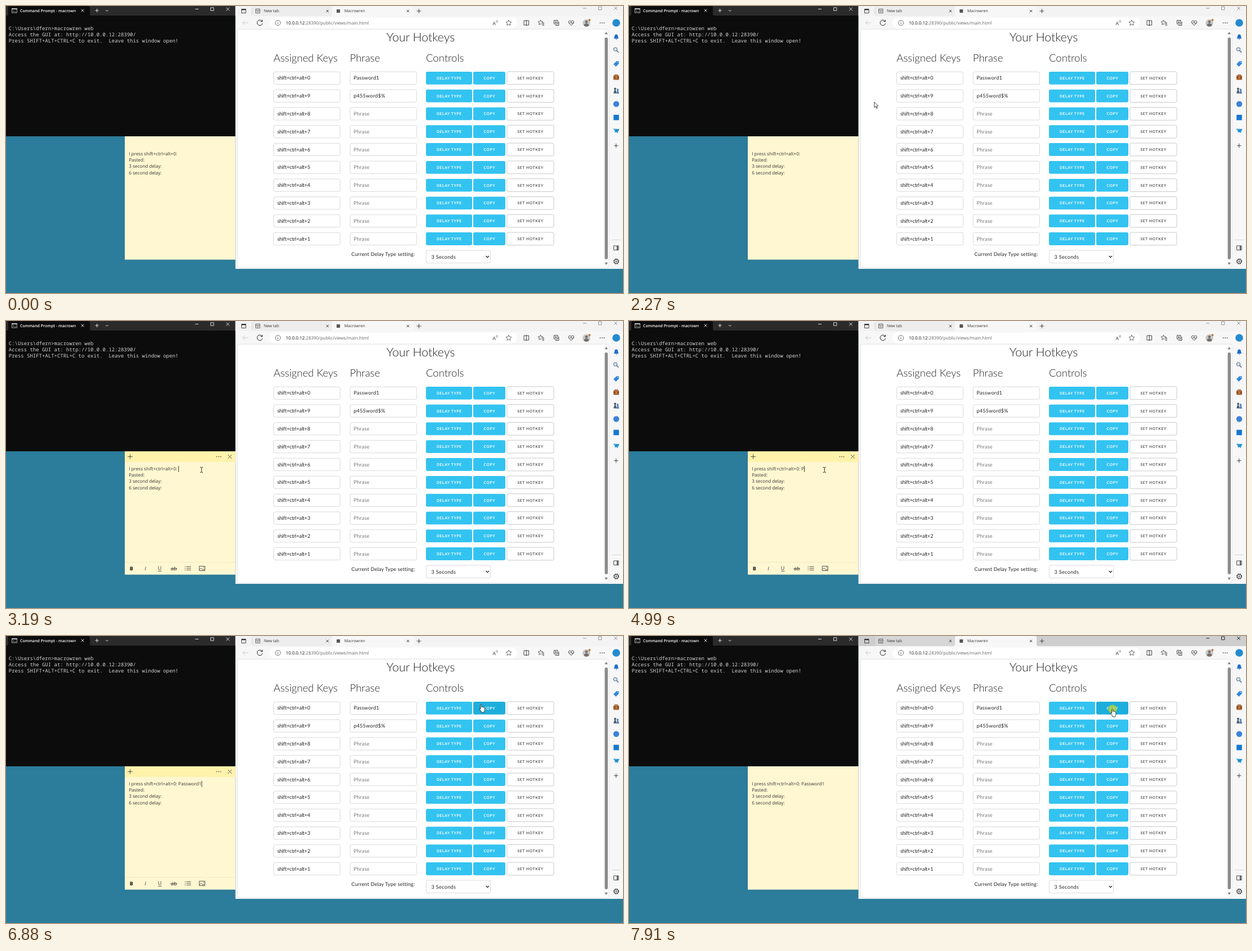
An HTML page that plays this animation: 1096x511 px, repeating every 8000 ms.

```html
<!DOCTYPE html>
<html lang="en">
<head>
<meta charset="utf-8">
<title>Hotkey demo</title>
<style>
  html, body { margin: 0; width: 100%; height: 100%; overflow: hidden; background: #2c7c9b; }
  svg { display: block; width: 100vw; height: 100vh; }
  text { white-space: pre; text-rendering: geometricPrecision; }
  .mono { font: 500 8.97px "Noto Sans Mono", "DejaVu Sans Mono", monospace; fill: #d2d2d2; }
  .caption { font: 600 7px "Open Sans", "Noto Sans", sans-serif; fill: #fff; }
  .tab { font: 7px "Open Sans", "Noto Sans", sans-serif; fill: #333; }
  .url { font: 7.93px "Open Sans", "Noto Sans", sans-serif; fill: #666; }
  .note { font: 8.15px "Open Sans", "Noto Sans", sans-serif; fill: #333; }
  .title, .head, .key, .phrase, .label, .pick, .btn { font-family: Lato, "Open Sans", sans-serif; fill: #222; }
  .title { font-size: 21.3px; font-weight: 300; text-anchor: middle; }
  .head { font-size: 18.5px; font-weight: 300; }
  .key { font-size: 9.05px; letter-spacing: -.2px; }
  .phrase { font-size: 9.05px; letter-spacing: .25px; }
  .empty { fill: #757575; }
  .label { font-size: 9.05px; letter-spacing: .18px; }
  .pick { font-size: 9.05px; letter-spacing: .35px; }
  .btn { font-size: 6.63px; font-weight: 700; letter-spacing: .68px; text-anchor: middle; fill: #fff; }
  .plain { fill: #555; }
  .line { fill: none; stroke: #333; stroke-width: .9; }
  .strip { fill: #f3f3f3; }
  .idle { fill: #ededed; }
  .frame { stroke: #8a8a8a; }
  .active .strip { fill: #cecece; }
  .active .idle { fill: #d6d6d6; }
  .active .frame { stroke: #111; }
</style>
</head>
<body>
<svg id="stage" viewBox="0 0 1096 511" preserveAspectRatio="none"></svg>
<script>
const LOOP = 8000, ROWS = 10, ROW_Y = 128.3, ROW_STEP = 31.8;
const BUTTONS = [
  { x: 746, w: 82, label: 'DELAY TYPE', fill: '#33c3f0', hover: '#1eaedb' },
  { x: 830, w: 57, label: 'COPY', fill: '#33c3f0', hover: '#1eaedb' },
  { x: 889.8, w: 83.2, label: 'SET HOTKEY', fill: '#fff', hover: '#fff' }
];
const FIELDS = [475.5, 611.3], FIELD_W = 118;

const rect = (x, y, w, h, fill, more = '') =>
  `<rect x="${x}" y="${y}" width="${w}" height="${h}" fill="${fill}" ${more}/>`;
const circle = (x, y, r, fill, more = '') => `<circle cx="${x}" cy="${y}" r="${r}" fill="${fill}" ${more}/>`;
const text = (x, y, cls, s, more = '') => `<text x="${x}" y="${y}" class="${cls}" ${more}>${s}</text>`;
const line = (d, more = '', cls = 'line') => `<path d="${d}" class="${cls}" ${more}/>`;
const stroke = (color, width = .9) => `style="stroke:${color};stroke-width:${width}"`;
const cross = (x, y, r) => `M${x - r} ${y - r}l${2 * r} ${2 * r}m0 ${-2 * r}l${-2 * r} ${2 * r}`;
const plus = (x, y, r) => `M${x - r} ${y}h${2 * r}M${x} ${y - r}v${2 * r}`;
const box = (x, y, w, h) => `M${x} ${y}h${w}v${h}h${-w}z`;
const windowKeys = (x, y) => `M${x - 3} ${y}h6${box(x + 24.5, y - 2.7, 5.4, 5.4)}${cross(x + 55, y, 2.8)}`;
const dots = (x, y, fill) => [-3.5, 0, 3.5].map(d => circle(x + d, y, .85, fill)).join('');

function terminal() {
  const white = stroke('#eee');
  return rect(0, 0, 407.6, 232, '#0c0c0c') + rect(0, 0, 407.6, 17, '#2b2b2b') +
    '<path d="M2 17q2 0 2-3V3q0-3 3-3h139q3 0 3 3v11q0 3 2 3z" fill="#0c0c0c"/>' +
    rect(10.5, 4.5, 9, 7.5, '#111', 'stroke="#ccc" stroke-width=".8"') + rect(10.5, 4.5, 9, 1.5, '#ccc') +
    line('M12.5 8l1.5 1-1.5 1m3 .3h2', stroke('#ddd', .7)) +
    '<clipPath id="cap"><path d="M20 0h104v17H20z"/></clipPath>' +
    text(25, 11, 'caption', 'Command Prompt - macrowren', 'clip-path="url(#cap)"') +
    line(cross(136, 8, 2.5) + plus(161.5, 8, 3.2) + 'M177 7l2.3 2.3 2.3-2.3' + windowKeys(339, 5.5), white) +
    ['C:\\Users\\dfern&gt;macrowren web', 'Access the GUI at: http://10.0.0.12:28390/',
     'Press SHIFT+ALT+CTRL+C to exit.  Leave this window open!']
      .map((s, i) => text(4.8, 42.6 + i * 11.25, 'mono', s)).join('');
}

function note() {
  const ink = stroke('#444');
  const bar = rect(211, 232, 196.6, 19, '#fff2ab') +
    line(plus(220.5, 241.5, 4.3) + cross(397.5, 241.5, 3.4), ink) + dots(378, 241.5, '#444') +
    line('M211 429.5h196.5', stroke('#efe6bd', .8)) +
    text(219.8, 443.6, 'note', 'B', 'style="font-weight:800;font-size:9px"') +
    text(246.3, 443.6, 'note', 'I', 'style="font-style:italic;font-size:9px"') +
    text(269.8, 443, 'note', 'U', 'style="font-size:9px"') + line('M270 445.3h6.5', ink) +
    text(293, 443.6, 'note', 'ab', 'style="font-size:9px"') + line('M292 441h12', ink) +
    line('M320.5 437.3h8m-8 3h8m-8 3h8M317.6 437.3h1.4m-1.4 3h1.4m-1.4 3h1.4', ink) +
    line(box(343.3, 436.5, 10, 8) + 'M343.3 443l3.3-3.2 4 4.4m-1-1.2l1.6-1.5 2 1.8', ink) +
    circle(351, 438.5, .8, '#444');
  return rect(211, 232, 196.6, 219.6, '#fff7d1') + `<g id="bar">${bar}</g>` +
    '<text id="typed" class="note" x="218.2" y="266.4"></text>' +
    ['Pasted:', '3 second delay:', '6 second delay:']
      .map((s, i) => text(218.2, 277.4 + i * 11.05, 'note', s)).join('') +
    rect(0, 258, .8, 11, '#111', 'id="caret"');
}

function toolbar() {
  const star = (x, y, r) => 'M' + Array.from({ length: 10 }, (_, i) => {
    const a = i * Math.PI / 5 - Math.PI / 2, q = i % 2 ? r * .48 : r;
    return `${(x + q * Math.cos(a)).toFixed(1)} ${(y + q * Math.sin(a)).toFixed(1)}`;
  }).join('L') + 'z';
  return rect(468, 20.5, 440, 19.5, '#fff', 'rx="9.7"') +
    line('M430 30h-9.5m4-4l-4 4 4 4', stroke('#c4c4c4')) +
    line('M455 27.3a4.8 4.8 0 1 0 .6 3.6M455.3 24.6v3.1h-3.1', stroke('#222', 1)) +
    circle(483, 30, 4.6, 'none', 'stroke="#555" stroke-width=".8"') + line('M483 29.2v3.2M483 27.2v1', stroke('#555')) +
    text(497, 32.8, 'url', '<tspan fill="#111">10.0.0.12</tspan>:28390/public/views/main.html') +
    text(864.5, 33.5, 'tab', 'A', 'style="font-size:8.5px"') + line('M870.5 26q1.4 1.2 0 2.6m1.6-3.8q2.4 2.5 0 5', stroke('#555', .7)) +
    line(star(893, 30.2, 5.2), stroke('#444', .8)) +
    line(box(920, 26, 8.6, 8) + 'M924.3 24.8v10.6') +
    line(star(949.5, 29.5, 4.6), stroke('#333', .8)) + rect(951, 29, 6, 6, '#f7f7f7') +
    line('M951.5 30h4.5m-4 2.2h4m-3 2.2h3') +
    line(box(973.5, 25.5, 6.5, 6.5) + 'M975.5 34.5h6.5v-6.5M976.7 27v3.6m-1.8-1.8h3.6') +
    line('M1004 34.7l-4.2-4.3q-1.6-2.5.6-4 2-1 3.6 1 1.6-2 3.6-1 2.2 1.5.6 4zm-3.3-4.6h1.8l1.4-1.8 1.5 3.2 1-1.4h1.5') +
    circle(1031, 30.3, 6.8, '#c9c7c6') + circle(1031, 28.2, 2.4, '#75706d') +
    '<path d="M1026.5 35q0-4 4.5-4t4.5 4q-4.5 3.5-9 0z" fill="#75706d"/>' + circle(1036.5, 25, 1.9, '#c8752d') +
    dots(1059, 30, '#222');
}

function sidebar() {
  return circle(1084, 30, 6.8, '#238bd0') +
    '<path d="M1079.5 58q1.5-1.3 1.5-4 0-3.5 3-3.5t3 3.5q0 2.7 1.5 4zm3 .8h3q-1.5 2.4-3 0z" fill="#1f6ccc"/>' +
    circle(1082.4, 77, 3.2, '#cfe4f6', 'stroke="#58697a" stroke-width="1"') + line('M1084.8 79.4l3.3 3.3', stroke('#58697a', 1.5)) +
    '<path d="M1079 103.5l5.5-5.3h4.2v4.2l-5.3 5.5z" fill="#2f86dc"/>' + circle(1086.8, 100.2, .8, '#fff') +
    line('M1082 124v-1.8h4v1.8', stroke('#8a4b22', 1.1)) + rect(1079, 123.5, 10, 8, '#a9602d', 'rx="1"') +
    rect(1079, 127, 10, 1, '#713b1b') + rect(1083.2, 126.4, 1.6, 2.2, '#e8b566') +
    circle(1082, 147.5, 2, '#4c5965') + '<path d="M1079 155.5l2-6h2l2 6z" fill="#4c5965"/>' +
    circle(1086.5, 149, 1.7, '#4d7fbd') + '<path d="M1084.7 156l1-6h1.8l1.6 6z" fill="#4d7fbd"/>' +
    circle(1084, 174.5, 5.2, '#3d82d6') + rect(1079.2, 193.7, 9.6, 9.6, '#1577cf') +
    '<path d="M1078.5 218.5l11 .5-3 7.5-3-2.5-1.5 2.5-.5-4z" fill="#36a6dd"/><path d="M1081.5 222.5l8-3.5-6 5z" fill="#186fb0"/>' +
    line(plus(1083.7, 248.7, 3.8)) + line('M1076 416.5h16', stroke('#d0d0d0')) +
    line(box(1079.6, 427, 8.5, 7.5) + 'M1085.4 427v7.5M1086.6 427v7.5') +
    circle(1084, 454.8, 4.3, 'none', 'stroke="#333" stroke-width="1.4" stroke-dasharray="2.3 1.08"') +
    circle(1084, 454.8, 3.6, 'none', 'stroke="#333" stroke-width=".8"') + circle(1084, 454.8, 1.3, 'none', 'stroke="#333" stroke-width=".8"');
}

function row(i) {
  const y = ROW_Y + i * ROW_STEP, top = y - 11.4;
  const phrase = ['Password1', 'p455word$%'][i];
  const edge = color => `rx="2.4" stroke="${color}" stroke-width=".8"`;
  return FIELDS.map(x => rect(x, top + .3, FIELD_W, 22.2, '#fff', edge('#d1d1d1'))).join('') +
    text(482, y + 3.1, 'key', 'shift+ctrl+alt+' + (ROWS - i) % ROWS) .replace(/\d</, `${(10 - i) % 10}<`) +
    text(617.5, y + 3.1, phrase ? 'phrase' : 'phrase empty', phrase || 'Phrase') +
    BUTTONS.map((b, k) =>
      rect(b.x, top, b.w, 22.8, b.fill, `id="b${i}_${k}" ` + (k < 2 ? 'rx="2.4"' : edge('#bbb'))) +
      text(b.x + b.w / 2 + .3, y + 2.4, k < 2 ? 'btn' : 'btn plain', b.label)).join('');
}

function browser() {
  const rows = Array.from({ length: ROWS }, (_, i) => row(i)).join('');
  return rect(407.6, 0, 688.4, 468, '#f7f7f7') + rect(407.6, 0, 688.4, 18, '', 'class="strip"').replace('fill=""', '') +
    '<path class="idle" d="M437 18V3q0-3 3-3h139v18z"/>' + line('M437 3v12', stroke('#c8c8c8', .7)) +
    '<path d="M576 18q3 0 3-3V3q0-3 3-3h139q3 0 3 3v12q0 3 3 3z" fill="#f7f7f7"/>' +
    line(box(418.5, 5.5, 7.5, 7)) + rect(418.5, 5.2, 7.5, 2.2, '#333') +
    line(box(443.5, 5.3, 7.5, 7.2) + 'M443.5 7.8h7.5M445.3 10h4', stroke('#444', .8)) +
    text(458, 11.4, 'tab', 'New tab') + rect(587.3, 6, 6, 6, '#555') + text(601, 11.4, 'tab', 'Macrowren') +
    line(cross(571, 9, 2.2) + cross(714, 9, 2.2) + plus(733.5, 9, 3.8)) + line(windowKeys(1028, 4), '', 'line frame') +
    toolbar() + sidebar() +
    rect(411, 41.2, 660, 424.8, '#fff', 'rx="4" stroke="#dedede" stroke-width=".8"') +
    rect(1062.3, 43, 8, 421, '#fafafa') + rect(1063.6, 56, 5.4, 395, '#8b8b8b', 'rx="2.7"') +
    '<path d="M1063.4 50.3h5.6l-2.8-4.4zM1063.4 456.7h5.6l-2.8 4.4z" fill="#808080"/>' +
    text(736.5, 62.5, 'title', 'Your Hotkeys') +
    text(475.3, 99.3, 'head', 'Assigned Keys') + text(610.8, 99.3, 'head', 'Phrase') + text(746, 99.3, 'head', 'Controls') +
    rows + text(613.5, 444.8, 'label', 'Current Delay Type setting:') +
    rect(746.4, 435, 114.2, 22.6, '#fff', 'rx="2.4" stroke="#d1d1d1" stroke-width=".8"') +
    text(755.5, 449.5, 'pick', '3 Seconds') + line('M852.6 445l2.7 2.7 2.7-2.7', stroke('#222', 1.3));
}

const POINTERS = {
  arrow: '<path d="M0 0v9.6l2.2-2 1.6 3.6 1.7-.7-1.6-3.5h3z" fill="#fff" stroke="#111" stroke-width=".8"/>',
  beam: line('M-2.6 -4.6q2.6 0 2.6 1v7.2q0 1-2.6 1M2.6 -4.6q-2.6 0-2.6 1m0 7.2q0 1 2.6 1', stroke('#111', .9)),
  hand: '<path d="M-1 1q1-1.6 2 0v4q1.1-1 1.9.2 1.3-.8 1.9.4 1.6-.5 1.6 1.2v3.5q0 1.7-1.2 2.8v1.6h-4.6v-1.4l-3.6-4.7q-.2-1.6 2-.3z" fill="#fff" stroke="#111" stroke-width=".8"/>'
};

const stage = document.getElementById('stage');
stage.innerHTML = rect(0, 0, 1096, 511, '#2c7c9b') + note() + terminal() + browser() +
  circle(0, 0, 7.8, '#b4d435', 'id="halo" opacity=".8"') +
  `<g id="pointer">${Object.entries(POINTERS).map(([k, s]) => `<g id="${k}">${s}</g>`).join('')}</g>`;
const get = id => document.getElementById(id);
const show = (id, on) => { get(id).style.display = on ? '' : 'none'; };

// Pointer route: time, x, y
const ROUTE = [
  [270, 905, 392], [530, 740, 265], [800, 590, 165], [1060, 490, 118],
  [1240, 467, 137], [1360, 513, 144], [1500, 560, 140], [1620, 571, 118], [1740, 530, 109], [1880, 500, 126],
  [1970, 496, 130], [2300, 430, 175], [2550, 370, 238], [2730, 350, 259], [2790, 347.3, 265],
  [5940, 347.3, 265], [6000, 420, 262], [6090, 640, 232], [6190, 828, 184], [6240, 829, 182],
  [6400, 850, 150], [6700, 858, 109], [6760, 856, 105], [6880, 844, 121.5], [6940, 843, 122],
  [7100, 850, 131], [7300, 866, 126], [7540, 858.5, 129.3]
];

function position(t) {
  const n = ROUTE.findIndex(p => p[0] > t);
  if (n < 0) return ROUTE[ROUTE.length - 1].slice(1);
  if (n === 0) return ROUTE[0].slice(1);
  const a = ROUTE[n - 1], b = ROUTE[n], k = (t - a[0]) / (b[0] - a[0]);
  return [a[1] + (b[1] - a[1]) * k, a[2] + (b[2] - a[2]) * k];
}

function target([x, y]) {
  const i = Math.round((y - ROW_Y) / ROW_STEP);
  if (i >= 0 && i < ROWS && Math.abs(y - ROW_Y - i * ROW_STEP) < 11.5) {
    const k = BUTTONS.findIndex(b => x >= b.x && x <= b.x + b.w + .5);
    if (k >= 0) return { kind: 'hand', id: `b${i}_${k}`, hover: BUTTONS[k].hover, fill: BUTTONS[k].fill };
    if (FIELDS.some(f => x >= f && x <= f + FIELD_W)) return { kind: 'beam' };
  }
  const overText = x < 407 && (y < 232 || (x > 211 && y < 452));
  return { kind: overText ? 'beam' : 'arrow' };
}

let lit = null, shown = null;
function draw(t) {
  const [x, y] = position(t), kind = target([x, y]).kind;
  show('pointer', t >= 270);
  get('pointer').setAttribute('transform', `translate(${x.toFixed(2)} ${y.toFixed(2)})`);
  for (const k in POINTERS) show(k, k === kind);

  // The page reacts slightly after the pointer arrives
  const under = t >= 305 ? target(position(t - 35)) : {};
  if (lit) get(lit.id).setAttribute('fill', lit.fill);
  lit = under.id ? under : null;
  if (lit) get(lit.id).setAttribute('fill', lit.hover);

  const focused = t >= 3090 && t < 7780;
  show('bar', focused);
  show('caret', focused);
  stage.classList.toggle('active', t >= 7780);
  show('halo', (t >= 3030 && t < 3150) || t >= 7780);
  get('halo').setAttribute('cx', x + .4);
  get('halo').setAttribute('cy', y + 1);

  const typed = 'I press shift+ctrl+alt+0: ' + (t < 4990 ? '' : t < 5050 ? 'P' : 'Password1');
  if (typed !== shown) {
    get('typed').textContent = shown = typed;
  }
  if (focused) get('caret').setAttribute('x', 218.4 + get('typed').getComputedTextLength());
}

const start = performance.now();
function tick() {
  draw((performance.now() - start) % LOOP);
  requestAnimationFrame(tick);
}
tick();
</script>
</body>
</html>
```
